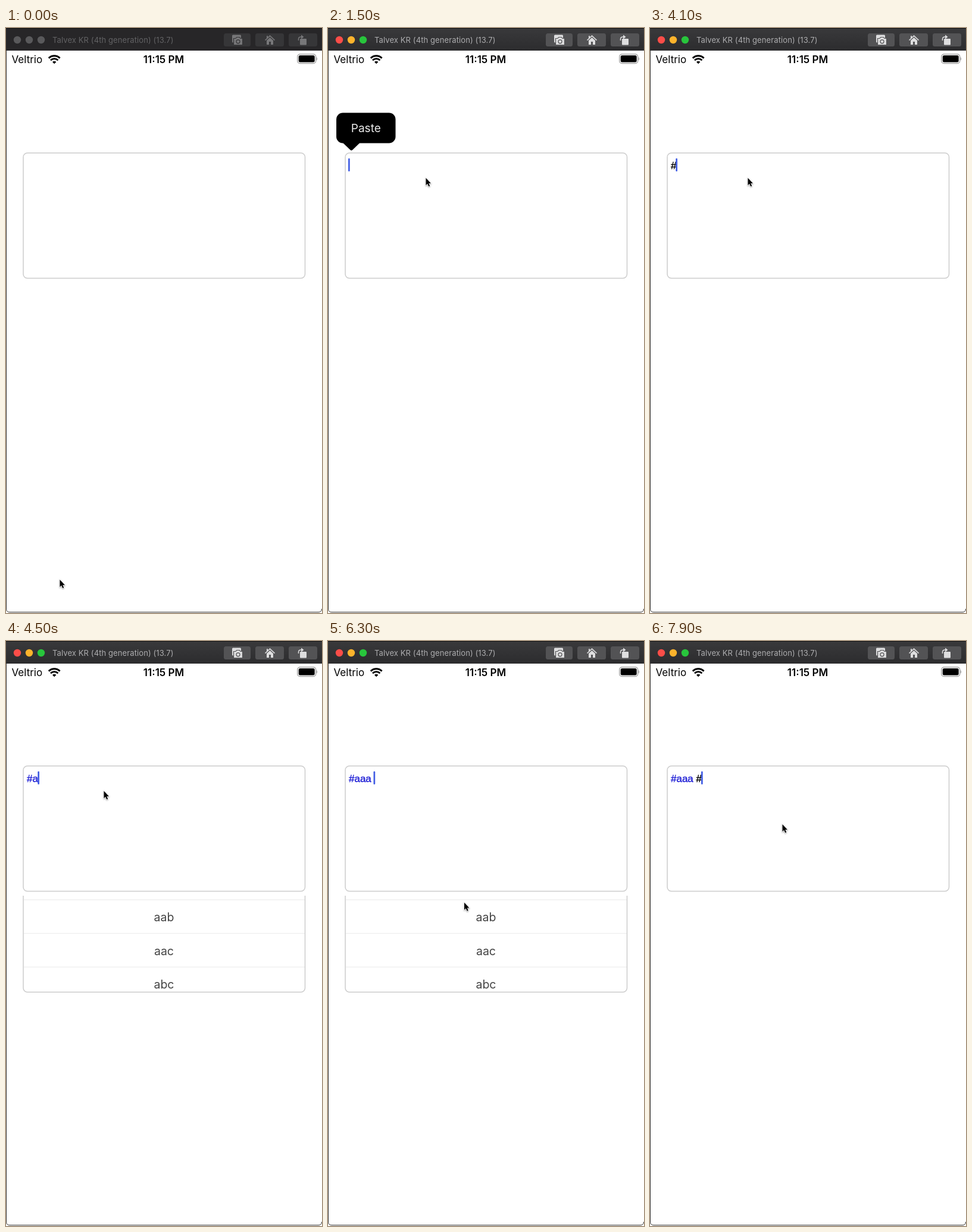
Write an HTML page that moves like this. It is 531 by 983 pixels and loops after 8 s.

```html
<!DOCTYPE html>
<html lang="en">
<head>
<meta charset="utf-8">
<title>Tag suggestions</title>
<style>
html, body { margin: 0; width: 100%; height: 100%; overflow: hidden; background: #fff; }
svg { display: block; width: 531px; height: 983px; font-family: Inter, Roboto, sans-serif; }
.bar { fill: #272628; }
.title { fill: #626264; font-size: 13px; letter-spacing: .1px; }
.light { fill: #59595b; }
.button { fill: #363638; }
.icon { fill: #777779; }
.cut { stroke: #363638; stroke-width: 1.2; }
.ring { fill: none; }
.turn { fill: none; stroke: #777779; stroke-width: 1.5; }
.active .bar { fill: url(#barShade); }
.active .title { fill: #adadaf; }
.active .light { fill: var(--on); }
.active .button { fill: #535355; }
.active .icon { fill: #dededf; }
.active .cut { stroke: #535355; }
.active .turn { stroke: #dededf; }
.status { font-size: 17px; }
.field { fill: none; stroke: #ccc; stroke-width: 1.5; }
.row { fill: #444; font-size: 19.5px; text-anchor: middle; }
.typed { font: 17px "Liberation Sans", Arial, sans-serif; white-space: pre; stroke-width: .4; }
#tag { fill: #2222d6; stroke: #2222d6; }
#rest { stroke: #000; }
</style>
</head>
<body>
<svg viewBox="0 0 531 983">
  <defs>
    <linearGradient id="barShade" x2="0" y2="1">
      <stop stop-color="#39393b"/><stop offset="1" stop-color="#2c2c2e"/>
    </linearGradient>
    <clipPath id="below"><rect y="428" width="531" height="240"/></clipPath>
    <clipPath id="panel"><rect x="29" y="429" width="473.5" height="210.5" rx="7"/></clipPath>
  </defs>

  <g id="window">
    <rect width="531" height="38" fill="#111"/>
    <rect class="bar" y="1" width="531" height="37"/>
    <circle class="light" cx="19" cy="20" r="6.2" style="--on:#fc4d48"/>
    <circle class="light" cx="39" cy="20" r="6.2" style="--on:#fdb32c"/>
    <circle class="light" cx="59" cy="20" r="6.2" style="--on:#28c53c"/>
    <text class="title" x="78" y="25">Talvex KR (4th generation) (13.7)</text>
    <rect class="button" x="366" y="9" width="45" height="22" rx="3.5"/>
    <rect class="button" x="419" y="9" width="48" height="22" rx="3.5"/>
    <rect class="button" x="475" y="9" width="48" height="22" rx="3.5"/>
    <!-- camera, home, rotate -->
    <rect class="icon" x="380" y="11.5" width="15" height="13" rx="1.5"/>
    <path class="icon cut" d="M382.500 17.500h3.500l1.500-2h5l1.500 2h3.500v11h-15z"/>
    <circle class="ring cut" cx="390" cy="22.800" r="3"/>
    <path class="icon" d="M443.500 12l8.500 8-1 1.200-7.500-7-7.500 7-1-1.200 3-2.800v-4h2v2zM438 21l5.500-5 5.500 5v7h-4v-5h-3v5h-4z"/>
    <rect class="icon" x="494" y="18" width="11" height="10.500" rx="1"/>
    <path class="turn" d="M491.500 21v-2.500q0-3.500 4-3.500h1"/>
    <path class="icon" d="M496 11.500v7l4.500-3.500z"/>
  </g>

  <path d="M.5 38V976q0 5.500 5.500 5.500H525q5.500 0 5.500-5.500" fill="none" stroke="#333"/>

  <g class="status">
    <text x="9.500" y="59">Veltrio</text>
    <text x="265" y="59" text-anchor="middle" font-weight="600">11:15 PM</text>
  </g>
  <g fill="none" stroke="#000" stroke-width="2.900">
    <path d="M71.800 50.600a13.300 13.300 0 0 1 18.800 0"/>
    <path d="M75 54.200a8.700 8.700 0 0 1 12.400 0"/>
    <path d="M81.200 60.300l-3.200-3.300a4.600 4.600 0 0 1 6.400 0z" fill="#000" stroke="none"/>
  </g>
  <rect x="489.700" y="44" width="31" height="15.500" rx="4.300" fill="none" stroke="#a4a4a4" stroke-width="1.400"/>
  <rect x="491.700" y="46" width="27" height="11.500" rx="2.500"/>
  <path d="M522 49.500q1.800 2.300 0 4.600z" fill="#a4a4a4" stroke="#a4a4a4" stroke-width=".7"/>

  <rect class="field" x="29" y="210" width="473.500" height="210.500" rx="7"/>
  <text class="typed" x="35" y="237"><tspan id="tag"></tspan><tspan id="rest"></tspan></text>
  <rect id="caret" y="219" width="2.700" height="22" rx="1.200" fill="#415de4"/>

  <g id="popup">
    <rect x="14" y="142.500" width="99.500" height="51" rx="11"/>
    <path d="M25 193h28.500l-12.500 12q-1.700 1.500-3.400 0z"/>
    <text x="63.800" y="175" text-anchor="middle" font-size="19" fill="#eaeaea">Paste</text>
  </g>

  <g clip-path="url(#below)">
    <g id="list">
      <g id="rows" clip-path="url(#panel)"></g>
      <rect class="field" x="29" y="429" width="473.500" height="210.500" rx="7"/>
    </g>
  </g>

  <path id="mouse" d="M.5 1V13.200L3.200 10.700 5.200 15.300 7.200 14.400 5.300 9.900H8.900z" stroke="#fff" stroke-width="1.300" paint-order="stroke" style="filter:drop-shadow(0 1px 1px #0006)"/>
</svg>

<script>
const $ = id => document.getElementById(id);
const LOOP = 8000, STEP = 100;

$('rows').innerHTML = ['aaa', 'aab', 'aac', 'abc'].map((word, i) => {
  const y = 464 + i * 56.5;
  return `<text class="row" x="265.500" y="${y}">${word}</text>` +
    `<path d="M30 ${y + 20.3}H502" stroke="#eee" stroke-width="1.200"/>`;
}).join('');

// start time, highlighted tag, plain text, caret position
const typing = [
  [1100, '', '', 34],
  [3000, '', '#', 43.3],
  [4300, '#a', '', 53.3],
  [6200, '#aaa', ' ', 76.5],
  [7700, '#aaa', ' #', 86]
];

const mousePath = [
  [0, 90, 926], [900, 164, 251], [5500, 164, 251],
  [5800, 214, 498], [6100, 228.5, 438.5], [6300, 228.5, 438.5], [6600, 222, 307]
];

const clamp = v => Math.max(0, Math.min(1, v));
const ramp = (t, from, to) => clamp((t - from) / (to - from));
const smooth = v => v * v * (3 - 2 * v);

function mouseAt(t) {
  const next = mousePath.findIndex(p => p[0] > t);
  if (next < 0) return mousePath.at(-1).slice(1);
  const a = mousePath[next - 1], b = mousePath[next];
  const k = smooth(ramp(t, a[0], b[0]));
  return [a[1] + (b[1] - a[1]) * k, a[2] + (b[2] - a[2]) * k];
}

// solid after each key press, then a soft one-second blink
function caretAlpha(age) {
  if (age < 500) return 1;
  let p = age % 1000;
  if (p >= 900) p -= 1000;
  return clamp(Math.min((700 - p) / 250, (p + 100) / 200));
}

function draw(t) {
  $('window').classList.toggle('active', t >= 1000);

  const [start, tag, rest, x] = typing.findLast(s => s[0] <= t) || [0, '', '', 34];
  $('tag').textContent = tag;
  $('rest').textContent = rest;
  $('caret').setAttribute('x', x);
  $('caret').setAttribute('opacity', t < 1100 ? 0 : caretAlpha(t - start));

  $('popup').setAttribute('opacity', ramp(t, 1300, 1500) * (1 - ramp(t, 2965, 3200)));

  const open = smooth(ramp(t, 4280, 4600)) - smooth(ramp(t, 6200, 6520));
  $('list').setAttribute('transform', `translate(0 ${-213 * (1 - open)})`);
  $('list').setAttribute('visibility', open > 0 ? 'visible' : 'hidden');

  $('mouse').setAttribute('transform', `translate(${mouseAt(t)})`);
}

const origin = performance.now();
function tick() {
  const t = (performance.now() - origin) % LOOP;
  draw(Math.floor(t / STEP) * STEP);
  requestAnimationFrame(tick);
}
tick();
</script>
</body>
</html>
```
